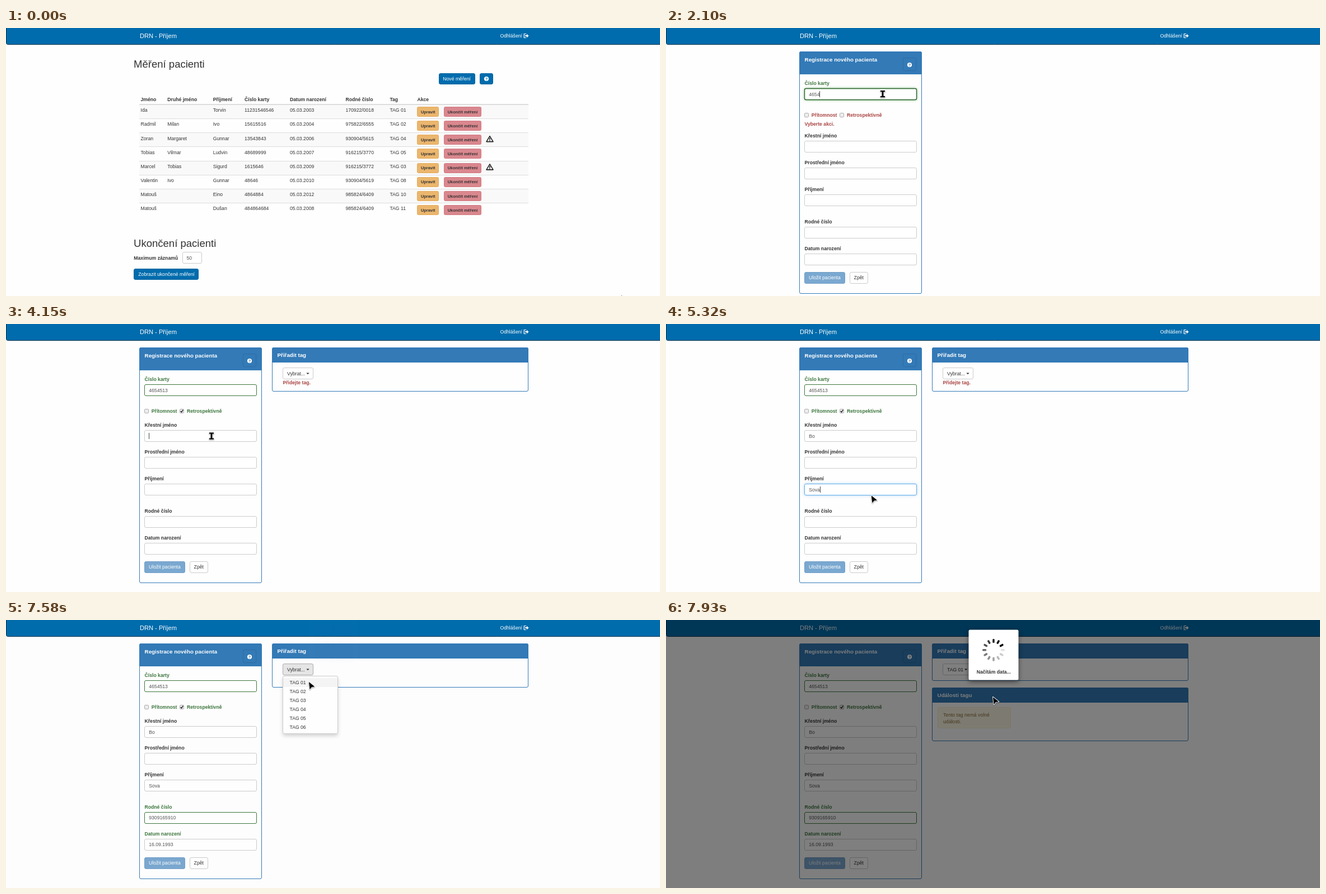
An HTML page with a canvas for the animation above (8000 ms loop, 1168 px wide and 480 px high).

```html
<!DOCTYPE html>
<html lang="cs">
<head>
<meta charset="utf-8">
<style>
  html, body { margin: 0; width: 100%; height: 100%; overflow: hidden; background: #fefefe; }
  canvas { display: block; }
</style>
</head>
<body>
<canvas id="stage" width="1168" height="480"></canvas>
<script>
const ctx = document.getElementById('stage').getContext('2d');
const LOOP = 8000, SIZE = 8.66;
const NAVY = '#006cad', BLUE = '#337ab7', INK = '#333', GREEN = '#3c763d', RED = '#a94442';

// Moments of the story, in ms
const OPEN_FORM = 1100, CHOOSE = 3000, MENU = 6820, PICK = 7600, FADE = 7580;
const RODNE_DONE = 6240;

const HEAD = ['Jméno', 'Druhé jméno', 'Příjmení', 'Číslo karty', 'Datum narození', 'Rodné číslo', 'Tag', 'Akce'];
const COLS = [240.5, 288.3, 369.7, 426, 507, 606.4, 685.4, 734.4];
const ROWS = [
  'Ida||Torvin|11231546546|05.03.2003|170922/0018|TAG 01',
  'Radmil|Milan|Ivo|15615516|05.03.2004|975822/6555|TAG 02',
  'Zoran|Margaret|Gunnar|13543843|05.03.2006|930904/5615|TAG 04',
  'Tobias|Vilmar|Ludvin|48689999|05.03.2007|916215/3770|TAG 05',
  'Marcel|Tobias|Sigurd|1615646|05.03.2009|916215/3772|TAG 03',
  'Valentin|Ivo|Gunnar|48646|05.03.2010|930904/5619|TAG 08',
  'Matouš||Eino|4864884|05.03.2012|985824/6409|TAG 10',
  'Matouš||Dušan|484864684|05.03.2008|985824/6409|TAG 11'
].map(r => r.split('|'));

// Fields: label, centre of the box, typed text, first key, key interval, focus from, focus to
const FIELDS = [
  ['Číslo karty', 118.5, '4654513', 1810, 92, 1760, CHOOSE],
  ['Křestní jméno', 212.5, 'Bo', 4400, 110, 4140, 4900],
  ['Prostřední jméno', 260.5, '', 0, 1, 0, 0],
  ['Příjmení', 308.5, 'Sova', 4990, 70, 4900, 5600],
  ['Rodné číslo', 366, '9309165910', 5900, 37, 5600, MENU],
  ['Datum narození', 414, '16.09.1993', RODNE_DONE, 0.01, 0, 0]
];

// Pointer path: time, x, y
const PATH = [
  [0, 1099, 479], [100, 1097, 477], [700, 808, 74], [870, 804, 89], [1120, 804, 89],
  [1650, 387, 118], [2400, 387, 118], [2520, 372, 134], [2880, 314, 156], [3420, 314, 156],
  [4100, 367, 200.5], [4560, 367, 200.5], [4850, 367, 302], [5290, 367, 302], [5480, 364, 376],
  [5600, 360, 358], [6200, 360, 358], [6480, 520, 112], [6680, 524, 91], [6880, 524, 91],
  [7300, 541, 111], [7640, 541, 111], [7930, 584, 138], [8000, 588, 140]
];

const clamp = v => Math.max(0, Math.min(1, v));

function text(s, x, y, color = INK, size = SIZE, bold = false) {
  ctx.font = (bold ? 'bold ' : '') + size + 'px "Liberation Sans", Arial, sans-serif';
  ctx.fillStyle = color;
  ctx.fillText(s, x, y + size * 0.36);
}
const strong = (s, x, y, color, size) => text(s, x, y, color, size, true);

function box(x, y, w, h, fill, line, r = 2.5, lw = 1) {
  ctx.beginPath();
  ctx.roundRect(x + 0.5, y + 0.5, w - 1, h - 1, r);
  ctx.fillStyle = fill;
  ctx.fill();
  if (!line) return;
  ctx.strokeStyle = line;
  ctx.lineWidth = lw;
  ctx.stroke();
}

function rect(x, y, w, h, fill) {
  ctx.fillStyle = fill;
  ctx.fillRect(x, y, w, h);
}

function poly(points, fill, line, lw = 1) {
  ctx.beginPath();
  points.forEach(([x, y]) => ctx.lineTo(x, y));
  ctx.closePath();
  ctx.lineJoin = 'round';
  if (line) { ctx.strokeStyle = line; ctx.lineWidth = lw; ctx.stroke(); }
  if (fill) { ctx.fillStyle = fill; ctx.fill(); }
}

function disc(x, y, r, fill) {
  ctx.beginPath();
  ctx.arc(x, y, r, 0, 7);
  ctx.fillStyle = fill;
  ctx.fill();
}

function help(x, y, back) {
  disc(x, y, 4.1, '#fff');
  strong('?', x - 2.1, y, back, 7);
}

function shadow(color, blur, dy = 0) {
  ctx.shadowColor = color;
  ctx.shadowBlur = blur;
  ctx.shadowOffsetY = dy;
}
const noShadow = () => shadow('transparent', 0);

function navbar() {
  ctx.beginPath();
  ctx.roundRect(0.5, -6, 1180, 35.5, 3);
  ctx.fillStyle = NAVY;
  ctx.fill();
  ctx.strokeStyle = '#0a2f47';
  ctx.lineWidth = 1;
  ctx.stroke();
  text('DRN - Příjem', 239, 14, '#fff', 11.1);
  text('Odhlášení', 882.5, 14, '#fff');
  ctx.beginPath();
  [[929, 10.5], [925.2, 10.5], [925.2, 17.5], [929, 17.5]].forEach(p => ctx.lineTo(...p));
  ctx.strokeStyle = '#fff';
  ctx.lineWidth = 1.2;
  ctx.stroke();
  poly([[927, 13], [930, 13], [930, 10.7], [933.6, 14], [930, 17.3], [930, 15], [927, 15]], '#fff');
}

function warning(x, y) {
  poly([[x, y - 5], [x + 6, y + 5], [x - 6, y + 5]], null, '#222', 1.6);
  rect(x - 0.8, y - 1.8, 1.6, 3.6, '#222');
  rect(x - 0.8, y + 2.4, 1.6, 1.4, '#222');
}

function listPage(p) {
  text('Měření pacienti', 228, 64.5, INK, 18.55);
  const over = p.x > 773 && p.x < 838 && p.y > 81 && p.y < 101;
  box(773, 81, 65, 20, over ? '#204d74' : NAVY, over ? '#5f86b8' : '#00639e');
  text('Nové měření', 780.3, 91, '#fff');
  box(846, 81, 24, 20, NAVY, '#00639e');
  help(858, 91, NAVY);

  HEAD.forEach((h, i) => strong(h, COLS[i], 127.5));
  ROWS.forEach((row, i) => {
    const y = 137 + i * 25.15, top = Math.round(y);
    if (i % 2 === 0) rect(238, top, 695, 25, '#f9f9f9');
    rect(238, top, 695, 1, '#ddd');
    row.forEach((s, c) => text(s, COLS[c], y + 10.2));
    box(734, top + 4, 39, 18, '#ebb66d', '#e5ab5c', 2);
    box(782, top + 4, 67, 18, '#da878e', '#d27a82', 2);
    strong('Upravit', 741, y + 13, INK, 7.42);
    strong('Ukončit měření', 788.7, y + 13, INK, 7.42);
    if (row[6] === 'TAG 04' || row[6] === 'TAG 03') warning(864, y + 11.3);
  });
  rect(238, 136, 695, 1, '#ddd');

  text('Ukončení pacienti', 228, 385.5, INK, 18.55);
  strong('Maximum záznamů', 228.3, 412);
  box(315, 401, 35, 21, '#fff', '#ccc');
  text('50', 322.5, 412, '#555');
  box(228, 431, 116, 20, NAVY, '#00639e');
  text('Zobrazit ukončené měření', 236.3, 441, '#fff');
}

function panel(x, y, w, h, headHeight, title, titleY) {
  box(x, y, w, h, '#fefefe', BLUE);
  box(x, y, w, headHeight, BLUE, BLUE, [2.5, 2.5, 0, 0]);
  strong(title, x + 9.6, titleY, '#fff', 9.75);
}

const fieldY = (i, t) => FIELDS[i][1] - (i && t >= CHOOSE ? 12 : 0);

function field(i, t) {
  const [label, , full, start, step, from, to] = FIELDS[i];
  const y = fieldY(i, t), top = Math.round(y - 10.5);
  const value = full.slice(0, t < start ? 0 : Math.floor((t - start) / step) + 1);
  const green = i === 0 ? value !== '' : i > 3 && t >= RODNE_DONE;
  const focus = t >= from && t < to;
  const glow = focus ? clamp((t - from) / 150) : 0;

  strong(label, 247.5, y - 19.5, green ? GREEN : INK);
  if (focus) shadow(green ? `rgba(103,177,104,${glow})` : `rgba(102,175,233,${0.7 * glow})`, 5);
  box(247, top, 201, 21, '#fff');
  noShadow();
  const edge = green && i < 5 ? (focus ? '#2b642c' : GREEN) : glow > 0.4 ? '#66afe9' : '#ccc';
  box(247, top, 201, 21, '#fff', edge, 2.5, green && focus ? 1.4 : 1);
  text(value, 255.2, y, '#555');
  if (focus && (t - from) % 1000 < 500)
    rect(Math.round(255.2 + ctx.measureText(value).width), top + 5, 1, 11, '#444');
}

function checkbox(x, on) {
  box(x, 152, 8, 8, '#eee', '#aaa', 1);
  if (!on) return;
  ctx.beginPath();
  [[x + 1.8, 156], [x + 3.4, 158], [x + 6.3, 153.6]].forEach(p => ctx.lineTo(...p));
  ctx.strokeStyle = '#222';
  ctx.lineWidth = 1.4;
  ctx.stroke();
}

function tagPanels(t, p) {
  const picked = t >= PICK, open = t >= MENU && !picked;
  panel(475, 42, 458, picked ? 67 : 79, 27, 'Přiřadit tag', 55.5);
  box(494, 78, picked ? 52 : 55, 21, open ? '#e6e6e6' : '#fff', open ? '#adadad' : '#ccc');
  text(picked ? 'TAG 01' : 'Vybrat...', 502, 88.8);
  const cx = picked ? 535.7 : 539;
  poly([[cx - 2.6, 87.5], [cx + 2.6, 87.5], [cx, 90.3]], INK);
  if (!picked) strong('Přidejte tag.', 494.4, 105, RED);
  if (picked) {
    panel(475, 121, 458, 96, 27, 'Události tagu', 134);
    box(485, 156, 131, 38, '#fcf8e3', '#faebcc');
    text('Tento tag nemá volné', 495, 169.8, '#8a6d3b');
    text('události.', 495, 182.2, '#8a6d3b');
  }
  if (open) {
    shadow('rgba(0,0,0,.18)', 7, 4);
    box(494, 100, 99, 104, '#fff');
    noShadow();
    box(494, 100, 99, 104, '#fff', '#ccc');
    for (let i = 0; i < 6; i++) {
      const y = 104 + i * 16;
      if (p.y > y && p.y < y + 16) rect(495, y, 97, 16, '#f5f5f5');
      text('TAG 0' + (i + 1), 506.5, y + 8);
    }
  }
}

function formPage(t, p) {
  const chosen = t >= CHOOSE, dy = chosen ? -12 : 0;
  panel(238, 42, 219, 434 + dy, 41, 'Registrace nového pacienta', 56.5);
  box(423, 53, 24, 24, BLUE, '#2e6da4');
  help(435, 66, BLUE);

  const tone = chosen ? GREEN : RED;
  checkbox(247, false);
  checkbox(310, chosen);
  strong('Přítomnost', 259.8, 156.3, tone);
  strong('Retrospektivně', 323, 156.3, tone);
  if (!chosen) strong('Vyberte akci.', 247.5, 171.5, RED);
  FIELDS.forEach((f, i) => field(i, t));

  box(247, 437 + dy, 73, 21, '#7aa8d0', '#73a0c8');
  text('Uložit pacienta', 255, 447.3 + dy, '#fff');
  box(328, 437 + dy, 33, 21, '#fff', '#ccc');
  text('Zpět', 335.6, 447.3 + dy);
  if (chosen) tagPanels(t, p);
}

function loader(t) {
  const shown = clamp((t - FADE) / 150);
  if (!shown) return;
  rect(0, 0, 1168, 480, `rgba(0,0,0,${shown / 2})`);
  ctx.save();
  ctx.globalAlpha = shown;
  ctx.translate(585, 17 - 23.5 * (1 - clamp((t - FADE) / 300)) ** 2);
  shadow('rgba(0,0,0,.5)', 9, 3);
  box(-45, 0, 90, 91, '#fff');
  noShadow();
  strong('Načítám data...', -30.3, 76.3);
  ctx.translate(0, 36.7);
  const head = Math.floor((t - 7930) / 83) + 2;
  for (let i = 0; i < 12; i++) {
    const age = (head - i + 24) % 12, g = Math.round(age * 20.5);
    ctx.save();
    ctx.rotate(i * Math.PI / 6);
    ctx.beginPath();
    ctx.roundRect(-1.8, -20, 3.6, 7.2, 1.5);
    ctx.fillStyle = `rgb(${g},${g},${g})`;
    ctx.fill();
    ctx.restore();
  }
  ctx.restore();
}

function pointerAt(t) {
  const i = Math.max(1, PATH.findIndex(k => k[0] > t));
  const [t0, x0, y0] = PATH[i - 1], [t1, x1, y1] = PATH[i];
  const u = (t - t0) / (t1 - t0), e = u * u * (3 - 2 * u);
  return { x: x0 + (x1 - x0) * e, y: y0 + (y1 - y0) * e };
}

function pointer(t, p) {
  const typing = t >= OPEN_FORM && p.x > 247 && p.x < 448 &&
    FIELDS.some((f, i) => Math.abs(p.y - fieldY(i, t)) < 10.5);
  ctx.save();
  ctx.translate(p.x, p.y);
  shadow('rgba(0,0,0,.3)', 2, 1);
  if (typing) {
    const beam = [[-4, -6], [4, -6], [4, -4], [1.3, -4], [1.3, 4], [4, 4], [4, 6],
      [-4, 6], [-4, 4], [-1.3, 4], [-1.3, -4], [-4, -4]];
    poly(beam, '#000', '#eee', 1.6);
  } else {
    poly([[0, 0], [10.2, 8.3], [4.9, 9.1], [1.6, 13.3]], '#000', '#fff', 2);
    if (t > 900 && t < 1250) {
      disc(8, 13, 4.6, '#fff');
      disc(8, 13, 3.9, '#111');
      disc(8, 13, 2.2, '#fff');
      disc(8, 13, 1.2, '#111');
    }
  }
  ctx.restore();
}

function draw(now) {
  const t = now % LOOP, p = pointerAt(t);
  rect(0, 0, 1168, 480, '#fefefe');
  navbar();
  if (t < OPEN_FORM) listPage(p);
  else formPage(t, p);
  loader(t);
  pointer(t, p);
}

const begin = performance.now();
function tick() {
  draw(performance.now() - begin);
  requestAnimationFrame(tick);
}
tick();
</script>
</body>
</html>
```
